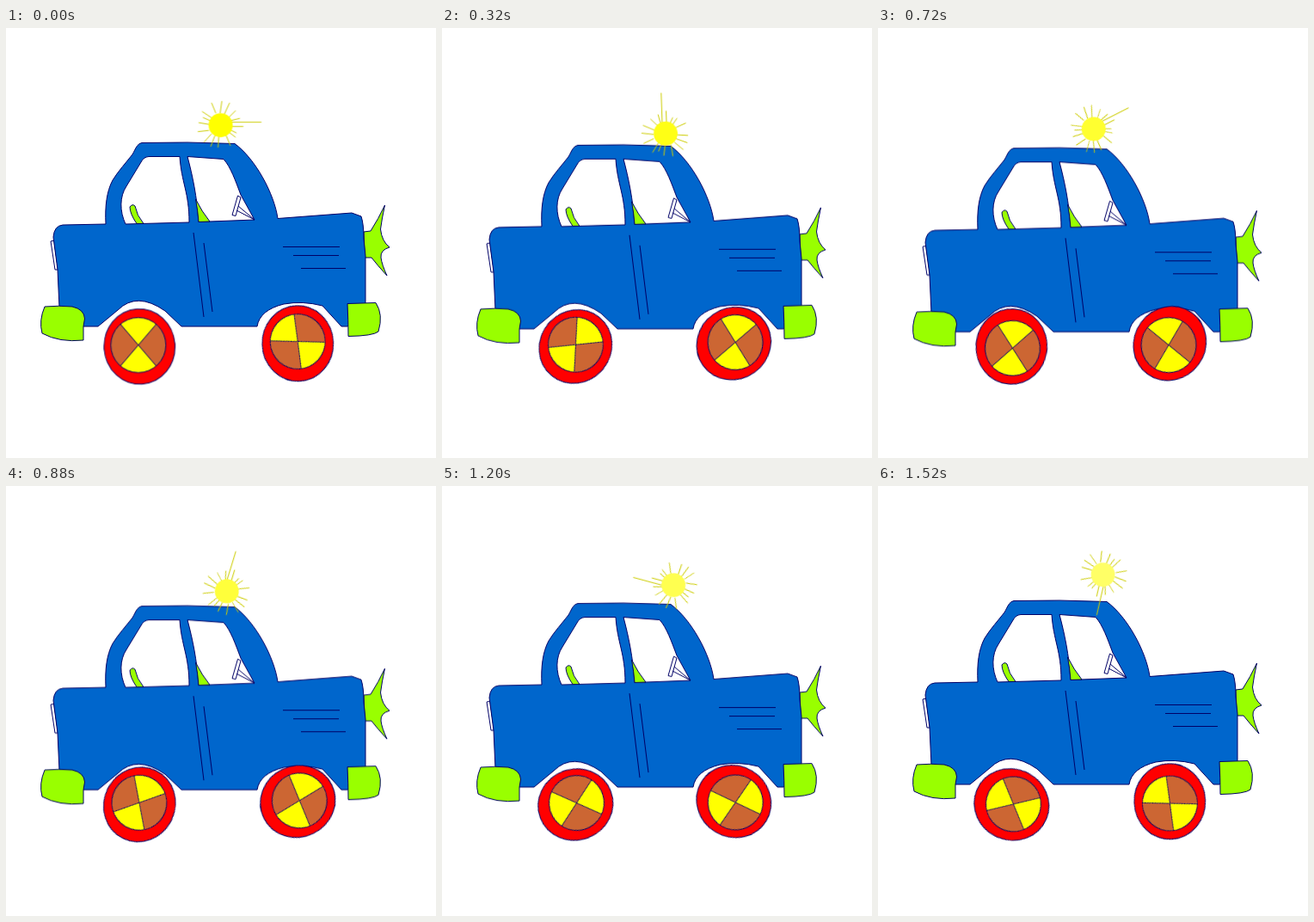
These frames come from a looping animation (500 px wide and 500 px high, 1.6 s). An HTML page:

```html
<!DOCTYPE html>
<html lang="en">
<head>
<meta charset="utf-8">
<title>Car</title>
<style>
  html, body { margin: 0; width: 100%; height: 100%; overflow: hidden; background: #fff; }
  svg { display: block; width: 500px; height: 500px; }

  .line { fill: none; stroke: #006; }
  .blue { fill: #06c; stroke: #006; }
  .green { fill: #9f0; stroke: #006; }
  .white { fill: #fff; stroke: #006; }
  .red { fill: #f00; stroke: #006; }
  .rays { fill: none; stroke: #cc0; }

  .bob { animation: bob 1.6s infinite; }
  .spin { animation: spin 1.6s steps(20) infinite; }
  .disc { animation: fade 1.6s steps(20) infinite; }
  .rear { --turn: 2018deg; }
  .front { --turn: 2084deg; }
  .sun { --turn: 3140deg; }

  @keyframes bob {
    0% { transform: translateY(0); animation-timing-function: steps(10); }
    50% { transform: translateY(7px); animation-timing-function: steps(9); }
    95%, 100% { transform: translateY(0); }
  }
  @keyframes spin {
    from { transform: rotate(0deg); }
    to { transform: rotate(var(--turn)); }
  }
  @keyframes fade {
    from { fill: #ff0; }
    to { fill: #ffff6b; }
  }
</style>
</head>
<body>
<svg viewBox="0 0 500 500" stroke-width="1" stroke-linejoin="round">
  <defs>
    <g id="hub">
      <circle r="32" fill="#ff0"/>
      <path fill="#c63" d="M24.3 20.8A32 32 0 0 1-24.3 20.8L24.3-20.8A32 32 0 0 0-24.3-20.8Z"/>
      <path class="line" d="M24.3 20.8L-24.3-20.8M-24.3 20.8L24.3-20.8"/>
      <circle class="line" r="32"/>
    </g>
  </defs>

  <g class="bob">
    <path class="white" d="M52 248L56 247L60.5 281L57 281Z"/>
    <path class="green" d="M416 237L424 236Q433 222 440.500 206Q437 222 435.500 234Q437 248 446 255Q435 258 436 267Q437 275 443 288Q432 276 425 267L417 267Z"/>
    <path class="blue" fill-rule="evenodd" d="M66 229L116 228C115 207 117 190 124 177C130 167 140 156 147 147C151 140 152 135 158 133.500Q210 132 266 134.500C290 152 312 193 316 221.500L402 215L413 219Q416 228 416 245L418 265L418 330L397 347L390 347L368 323Q345 317 323 321Q295 328 292 347L204 347L185 329Q152 306 130 328L107 347L62 347L62 325L60 281L55 243Q56 230 66 229Z
      M139 228L213 226C213 191 204 180 202 149.500L166 149.500Q160 150 157 156L140 184C132 196 132 213 139 228Z
      M224 225.500L289 223L273 194C267 178 261 161 253 152.500L211 149.500C217 172 222 196 224 225.500Z"/>
    <path class="green" d="M152 227.500Q144 216 144 208Q147 204 150 207Q152 218 160 227.500Z"/>
    <path class="green" d="M220.500 199Q228 214 237 225L224 225.500Q223 212 220.500 199Z"/>
    <path class="white" d="M269.500 195L273 197L267 218.500L263 217.500Z"/>
    <path class="line" d="M270 207L289 223M268 212L289 223"/>
    <path class="line" d="M218 238L230 336M230 250L240 330M322 254.500H388M334 264.500H387M343 279.500H395"/>
    <path class="green" d="M45 324Q62 322.500 77 324Q91 327 91.500 338L90 347V363Q62 366 42 355Q38 340 45 324Z"/>
    <path class="green" d="M397 320.500L430 319.500Q439 333 433 353Q427 358 398 358.500Q398 340 397 320.500Z"/>
  </g>

  <g transform="translate(155.300 370.400) rotate(-90)">
    <g class="spin rear">
      <ellipse class="red" rx="43.800" ry="41.300" transform="rotate(-4)"/>
      <use href="#hub" x="1.700" y="-1.400"/>
    </g>
  </g>
  <g transform="translate(339.300 366.800) rotate(-138)">
    <g class="spin front">
      <ellipse class="red" rx="44" ry="41.400" transform="rotate(46)"/>
      <use href="#hub" x="1.600" y="1.600"/>
    </g>
  </g>

  <g transform="translate(259.500 112.800)">
    <g class="spin sun">
      <g transform="translate(-259.500 -112.800)">
        <path class="rays" d="M239 87L244 99M251 85L249 99M260 87L254 100M267 96L259 104M272 105L260 108M262 109.500H297M262 114.500H276M268 122L260 118M267 127L259 121M261 137L256 125M246.500 139L247.500 126M238 138L243 125M230 133L239 123M223 120.500L236 119M224 110L236 112M229 104L238 108M228 97L240 105"/>
        <circle class="disc" cx="249.600" cy="113" r="14"/>
      </g>
    </g>
  </g>
</svg>
</body>
</html>
```
